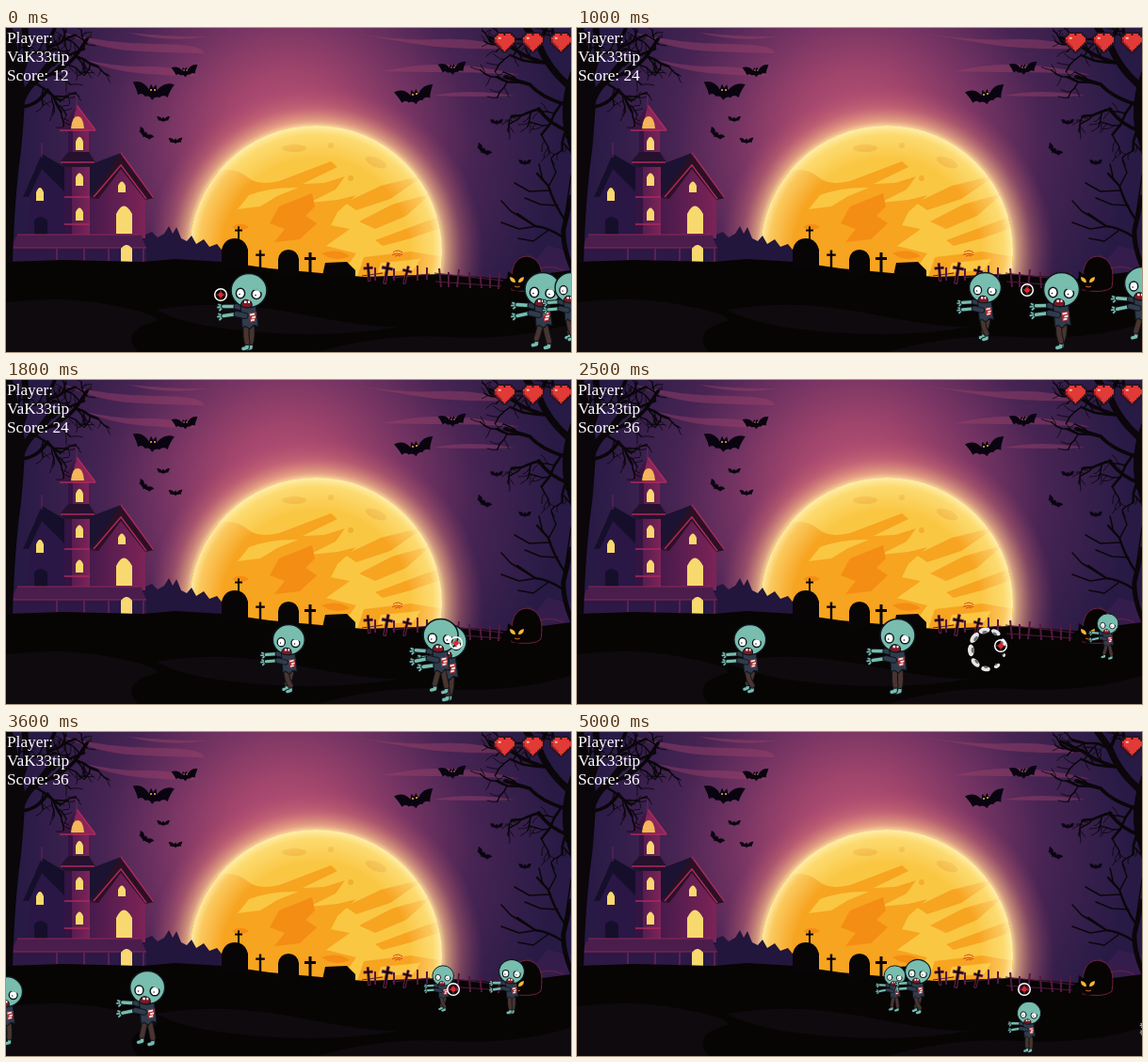
Recreate the animation shown at these times as an HTML page with a canvas. Size 600 px wide and 345 px high, loop 5100 ms.

```html
<!DOCTYPE html>
<html lang="en">
<head>
<meta charset="utf-8">
<title>Graveyard shooter</title>
<style>
  html, body { margin: 0; width: 100%; height: 100%; overflow: hidden; background: #070404; }
  svg, canvas { position: absolute; left: 0; top: 0; width: 600px; height: 345px; }
  #hud { position: absolute; left: 1px; top: .5px; color: #fff; font: 17.3px/20px "Liberation Serif", serif; white-space: pre; }
</style>
</head>
<body>
<svg viewBox="0 0 600 345">
  <defs>
    <radialGradient id="sky" gradientUnits="userSpaceOnUse" cx="300" cy="120" r="290">
      <stop offset="0" stop-color="#c4587a"/><stop offset=".25" stop-color="#a1456c"/>
      <stop offset=".45" stop-color="#763463"/><stop offset=".68" stop-color="#472453"/>
      <stop offset="1" stop-color="#271a45"/>
    </radialGradient>
    <radialGradient id="halo" gradientUnits="userSpaceOnUse" cx="329" cy="238" r="178">
      <stop offset=".74" stop-color="#ffe9a8"/><stop offset=".78" stop-color="#f5bd88" stop-opacity=".75"/>
      <stop offset=".87" stop-color="#d87c76" stop-opacity=".38"/><stop offset="1" stop-color="#b04a70" stop-opacity="0"/>
    </radialGradient>
    <radialGradient id="rim" gradientUnits="userSpaceOnUse" cx="329" cy="238" r="134">
      <stop offset=".74" stop-color="#fff0a8" stop-opacity="0"/><stop offset=".93" stop-color="#ffee9c" stop-opacity=".5"/>
      <stop offset="1" stop-color="#fff3b8" stop-opacity=".9"/>
    </radialGradient>
    <linearGradient id="wall" x2="1">
      <stop offset="0" stop-color="#461a4b"/><stop offset="1" stop-color="#7d2357"/>
    </linearGradient>
    <clipPath id="moon"><circle cx="329" cy="238" r="134"/></clipPath>
    <path id="bat" d="M-1-.35Q-.5-.5-.2-.05L-.12-.32 0-.14 .12-.32 .2-.05Q.5-.5 1-.4Q.78 0 .74.25Q.5.1 .35.3Q.15.2 0 .45Q-.15.2-.35.3Q-.5.1-.7.25Q-.78 0-1-.35Z"/>
    <path id="cross" d="M-1.5-12H1.5V-7H6V-4H1.5V12H-1.5V-4H-6V-7H-1.5Z"/>
  </defs>

  <rect width="600" height="345" fill="url(#sky)"/>
  <g fill="#9d4069" opacity=".45">
    <path d="M60 5Q110 17 160 17T210 27Q160 26 130 24T60 5ZM85 34Q120 42 150 41T205 51Q170 51 140 48T85 34ZM130 5Q180 10 215 9Q170 16 130 5Z"/>
    <path d="M372 6Q420 14 460 12T540 22Q480 23 450 19T372 6ZM400 46Q440 37 475 39T545 50Q500 47 470 47T400 46ZM455 72Q490 64 540 72Q500 74 455 72Z"/>
  </g>

  <circle cx="329" cy="238" r="178" fill="url(#halo)"/>
  <g clip-path="url(#moon)" fill="#f7a420">
    <circle cx="329" cy="238" r="134" fill="#fac743"/>
    <path d="M205 165Q235 140 258 160Q268 168 290 163L345 142 352 148 315 166 338 165 360 158 350 172 322 186 352 183 372 178 352 196 345 210 365 214 340 232 372 240 350 270H190V235Q194 195 205 165Z"/>
    <path d="M360 186L398 168 446 156 408 182 372 194ZM375 206L410 188 452 176 425 200 392 214ZM392 226L462 200 464 212 430 224 400 232ZM380 244L430 238 466 244V268H372Z"/>
    <path fill="#f48d14" d="M290 190L325 176 328 190 318 200 330 208 312 225 285 228 296 214 280 208ZM240 212q9-7 18 0q-9 6-18 0ZM335 240q18-6 30 3q-16 7-30-3Z"/>
    <path fill="#fac743" d="M258 178Q282 169 310 170L288 179 270 190 246 193ZM398 250L440 246 432 258 395 260Z"/>
    <g fill="#f2b033"><ellipse cx="306" cy="128" rx="13" ry="4"/><ellipse cx="393" cy="143" rx="12" ry="5" transform="rotate(22 393 143)"/><circle cx="366" cy="160" r="3"/><circle cx="345" cy="125" r="3"/></g>
    <circle cx="329" cy="238" r="134" fill="url(#rim)"/>
    <path d="M411 239q5-4 10 0M410 241.500q5-3 11 0M413 243q4-2 6 0" stroke="#d8432b" fill="none"/>
  </g>

  <path fill="#22163c" d="M138 252V216l5-6 5 10 7-3 6 6 7-4 5-8 4 8 4-7 5 12 6 3 5-6 5 9 8-5 6 8 8-3 8 10V252Z"/>
  <path fill="#3c2152" opacity=".6" d="M545 252l10-12 8 6 12-14 25 6V270H545Z"/>

  <!-- House -->
  <g>
    <path fill="#2a1745" d="M24 178L39 145 62 172V224H24Z"/>
    <path fill="#150f2b" d="M18 180L38 134 62 148V174L38 150 24 180ZM30 205q6-8 14 0v19H30Z"/>
    <path fill="url(#wall)" d="M88 180L122 142 148 180V224H88Z"/>
    <path fill="#1b1331" d="M88 146L122 133 102 166 88 182Z"/>
    <path fill="#2b1024" d="M122 133L158 181 148 183 122 150 98 182 90 181Z"/>
    <path stroke="#a82a5f" stroke-width="1.500" fill="none" d="M93 180L122 146 149 182M122 133L157 181"/>
    <path fill="url(#wall)" d="M62 142H89V224H62ZM66 106H88V136H66Z"/>
    <path fill="#331443" d="M62 142H70V224H62ZM66 106H71V136H66Z"/>
    <path fill="#8b2458" d="M56 109L75 82 96 109Z"/><path fill="#3c1642" d="M56 109L75 82 69 109Z"/>
    <path fill="#25112e" d="M57 143L66 132H88L95 143 89 148H62Z"/>
    <path stroke="#a82a5f" d="M57 109H95M58 143H94M62 180H89M62 209H89M75 82L95 109" stroke-width="1.500"/>
    <path fill="#2c1946" d="M7 250V234L12 220H143L149 235V250Z"/>
    <path fill="#4a1d4c" d="M5 234L12 220H143L149 234Z"/>
    <path stroke="#8e2659" d="M12 220H143M5 234H149"/>
    <path stroke="#5b2150" stroke-width="2" d="M54 235V250M83 235V250M109 235V250M146 235V250"/>
    <path stroke="#662658" d="M38 122V138M75 72V88M124 121V136"/>
    <path fill="#f4b657" d="M69 107q1-13 7-13t7 13Z"/>
    <path fill="#f8d96f" d="M74 130v-9q4-10 8 0v9ZM74 168v-9q4-9 8 0v9ZM74 205v-9q4-9 8 0v9ZM32 184v-9q4-10 8 0v9ZM119 175v-7q4-9 8 0v7ZM117 219v-21q8-17 17 0v21ZM122 250v-15q6-8 12 0v15Z"/>
  </g>

  <!-- Ground and graves -->
  <path fill="#070404" d="M0 249L60 247 145 249 180 246 230 249 280 256 335 261 380 265 460 262 530 267 600 258V345H0Z"/>
  <path fill="#0e0a0e" d="M0 292Q60 285 112 295T160 312Q120 322 140 345H0ZM160 300Q230 288 310 304T420 318Q350 330 270 324T160 300ZM330 345Q400 325 470 329T600 315V345Z"/>
  <g fill="#080506">
    <path d="M229 256V236Q232 224 243 224T257 236V256ZM289 262V246Q291 236 300 236T311 246V262ZM336 264L339 250 362 249 371 258V267Z"/>
    <use href="#cross" transform="translate(247 219) scale(.65)"/>
    <use href="#cross" transform="translate(270 246) scale(.8)"/>
    <use href="#cross" transform="translate(323 251)"/>
  </g>
  <g stroke="#53193f" fill="none">
    <path d="M378 264L400 261M410 266L450 262M455 261L528 269M456 270L526 275"/>
    <path stroke-width="2" d="M392 255v14M412 256v13M437 253v16M447 255v13M460 256l2 20M470 260v16M481 257l-2 19M492 260l1 17M503 259l2 18M514 262v15M524 260l-1 18"/>
  </g>
  <g fill="#10050d" stroke="#87305a" stroke-width=".8">
    <use href="#cross" transform="translate(385 260) rotate(-5) scale(.8)"/>
    <use href="#cross" transform="translate(404 261) rotate(10) scale(.95)"/>
    <use href="#cross" transform="translate(425 263) rotate(14) scale(.8)"/>
  </g>
  <g fill="#070404" stroke="#74203a">
    <path d="M537 279Q534 244 553 243Q573 246 568 276Q561 283 537 279Z"/>
    <path stroke="none" d="M532 272l1-13 6 4h7l6-4 1 13q-4 8-10 8t-11-8Z"/>
    <path d="M567 256Q580 252 592 258" fill="none"/>
  </g>
  <path fill="#f8b832" d="M535 265q6 1 6 6q-6 0-6-6ZM550 265q-6 1-6 6q6 0 6-6Z"/>
  <path stroke="#c46b25" d="M540 275l3 1 3-1" fill="none"/>

  <!-- Trees -->
  <path fill="#0a0609" d="M0 0H7Q15 30 20 64Q20 90 16 130Q9 180 7 250H0ZM600 45Q588 75 592 105L600 135Z"/>
  <g id="trees" fill="none" stroke="#0a0609" stroke-linecap="round" stroke-linejoin="round">
    <path stroke-width="7" d="M13 90Q18 65 34 54L50 34M12 60L22 28 20 0M598 62Q575 42 566 18L553 0"/>
    <path stroke-width="3.500" d="M34 54Q58 48 74 30L86 12M46 38L44 16 52 0M17 84Q34 82 44 66M10 30L4 0M596 82Q570 75 556 60L530 52M578 38Q555 34 536 20L514 10M566 18L574 0M598 110Q576 102 566 86"/>
    <path stroke-width="5" d="M603 260Q591 235 592 215L600 180"/>
    <path stroke-width="2.500" d="M592 223Q575 212 562 211L543 198M594 205Q582 188 576 168L564 155"/>
    <path stroke-width="1.500" d="M564 211L545 214 526 207M554 206L536 195 526 184M577 173L556 174 540 165M570 162L566 145M576 169L584 154 579 140M594 199L600 157M586 189L568 188 551 181M575 216L560 227 544 224"/>
  </g>

  <g fill="#090410">
    <use href="#bat" transform="translate(156 67) rotate(5) scale(22)"/>
    <use href="#bat" transform="translate(190 46) rotate(-5) scale(14)"/>
    <use href="#bat" transform="translate(148 113) rotate(38) scale(9)"/>
    <use href="#bat" transform="translate(167 97) scale(7)"/>
    <use href="#bat" transform="translate(180 120) scale(7.500)"/>
    <use href="#bat" transform="translate(434 72) rotate(-10) scale(21)"/>
    <use href="#bat" transform="translate(474 43) rotate(-4) scale(15)"/>
    <use href="#bat" transform="translate(507 130) rotate(38) scale(9)"/>
    <use href="#bat" transform="translate(521 100) scale(7)"/>
    <use href="#bat" transform="translate(551 143) scale(7)"/>
  </g>
  <g fill="#f3b73d">
    <circle cx="154" cy="66" r="1"/><circle cx="158" cy="66" r="1"/><circle cx="432" cy="71" r="1"/><circle cx="436" cy="70" r="1"/>
    <circle cx="189" cy="45" r=".7"/><circle cx="192" cy="45" r=".7"/><circle cx="473" cy="42" r=".7"/><circle cx="476" cy="42" r=".7"/>
  </g>
</svg>
<canvas id="game" width="600" height="345"></canvas>
<div id="hud"></div>

<script>
const LOOP = 5100, STEP = 100;
const g = document.getElementById('game').getContext('2d');
const hud = document.getElementById('hud');
const INK = '#0f171d', SKIN = '#78bdae', CLOTH = '#303b4c', TROUSERS = '#4a342f';

// x at time zero, speed in px/s, top, height, time of death
const zombies = [
  { x: 258, v: 60, top: 261, h: 82, dies: 200 },
  { x: 570, v: 55.5, top: 260, h: 82, dies: 2300 },
  { x: 600, v: 166.5, top: 260, h: 73 },
  { x: 773, v: 173, top: 254, h: 80 },
  { x: 790, v: 90.5, top: 248.5, h: 49 },
  { x: 987, v: 125, top: 242, h: 58 },
  { x: 1130, v: 130, top: 287, h: 54 },
  { x: 1270, v: 130, top: 289, h: 54 }
];
// time, x, y
const aim = [[0, 228, 284], [200, 228, 284], [700, 470, 281], [1000, 478, 279], [1800, 478, 280],
  [2200, 450, 283], [2500, 450, 283], [3000, 477, 271], [3500, 475, 274], [LOOP, 475, 274]];
const heart = new Path2D('M2 0h3v1h1v-1h3v1h1v1h1v3h-1v1h-1v1h-1v1h-1v1h-1v1h-1v-1h-1v-1h-1v-1h-1v-1h-1v-1h-1v-3h1v-1h1z');

// Forking twigs, grown once into the tree group
let seed = 7;
const random = () => (seed = seed * 16807 % 2147483647) / 2147483647;
const twigs = ['', '', ''];
function grow(x, y, angle, length, level) {
  twigs[level] += `M${x} ${y}`;
  for (let i = 0; i < 3; i++) {
    angle += (random() - .5) * .9;
    x += Math.cos(angle) * length / 3;
    y += Math.sin(angle) * length / 3;
    twigs[level] += `L${x.toFixed(1)} ${y.toFixed(1)}`;
    if (level < 2) grow(x, y, angle + (random() < .5 ? -.8 : .8), length * .55, level + 1);
  }
}
for (const [x, y, angle, length] of [
  [34, 54, .1, 44], [30, 58, .7, 34], [50, 40, -.3, 38], [44, 66, .9, 28], [22, 28, -.6, 30],
  [74, 30, 0, 26], [46, 20, -.4, 30], [12, 30, -1.2, 26],
  [566, 18, 3.3, 42], [578, 38, 2.8, 44], [556, 60, 3, 36], [566, 86, 2.4, 30],
  [590, 80, 2.2, 40], [585, 20, -2, 24], [536, 20, 2.9, 24], [596, 105, 2, 26]
]) grow(x, y, angle, length, 0);
document.getElementById('trees').innerHTML +=
  twigs.map((d, i) => `<path stroke-width="${[2.6, 1.5, .8][i]}" d="${d}"/>`).join('');

function shape(color, d, line = 1.2) {
  const path = new Path2D(d);
  g.fillStyle = color;
  g.fill(path);
  if (line) { g.lineWidth = line; g.strokeStyle = INK; g.stroke(path); }
}

function limb(color, width, d) {
  const path = new Path2D(d);
  for (const [c, w] of [[INK, width + 2], [color, width]]) {
    g.strokeStyle = c; g.lineWidth = w; g.stroke(path);
  }
}

function oval(x, y, rx, ry, color, line = 0) {
  g.beginPath();
  g.ellipse(x, y, rx, ry, 0, 0, 7);
  g.fillStyle = color;
  g.fill();
  if (line) { g.lineWidth = line; g.strokeStyle = INK; g.stroke(); }
}

function at(x, y, scale, draw) {
  g.save();
  g.translate(x, y);
  g.scale(scale, scale);
  draw();
  g.restore();
}

function arm(y, drop) {
  limb(SKIN, 1.8, `M-27 ${y + drop}l-5-2M-27 ${y + drop}l-6 1M-27 ${y + drop}l-4 4`);
  limb(SKIN, 3.6, `M-13 ${y}L-27 ${y + drop}`);
  limb(CLOTH, 5, `M-4 ${y + 2}L-13 ${y}`);
}

function zombie(swing) {
  for (const side of [1, -1]) {
    const foot = -1 + side * (2 + 5 * swing), up = Math.max(0, -side * swing) * 3;
    limb(SKIN, 3.5, `M${foot + 1} ${57 - up}v4l-4 1`);
    limb(TROUSERS, 5, `M${side * 3} 40L${side * 3 + swing * side * 2} ${48 - up / 2}L${foot + 1} ${55 - up}`);
  }
  arm(17, 0 - swing);
  shape(CLOTH, 'M-9 14H7L10 38 5 37 1 41-4 38-7 40Z');
  shape('#a72c35', 'M0 24L8 23 7 33 1 34Z', 0);
  shape('#f0e8df', 'M1 25l5-1v2l-5 1zM3 28l4-1v2l-4 1zM2 31l4-1v2l-4 1z', 0);
  arm(25, 2 + swing);
  oval(0, 0, 19, 18, SKIN, 1.6);
  oval(-9, 3, 4.6, 5.2, '#fff', 1.5);
  oval(8, 4, 5, 5, '#fff', 1.5);
  oval(-10, 4, .8, .8, INK);
  oval(7, 5, .8, .8, INK);
  shape(SKIN, 'M2-2L14-2 14 2Z', 0);
  shape('#7d1824', 'M-9 16Q-7 9-2 10Q4 11 3 17Q-3 20-9 16Z');
  shape('#fff', 'M-5 11h2.500v2.500h-2.500zM-1 11h2v2.500h-2z', 0);
}

function burst(x, y, age) {
  const r = 13 + age / 40, size = 1 - Math.max(0, age - 250) / 300;
  for (let i = 0; i < 9; i++) {
    const a = i * 0.7 + 0.3, n = Math.abs(Math.sin(i * 12.9));
    g.save();
    g.translate(x + Math.cos(a) * r, y + Math.sin(a) * r * 1.15);
    g.rotate(a);
    oval(0, 0, (1.4 + 2 * n) * size, (2 + 4.5 * n) * size, '#e6e6e6');
    oval(-1.8, 0, (.6 + n) * size, (1 + 2 * n) * size, '#6d6d70');
    g.restore();
  }
}

function crosshair(t) {
  const i = aim.findIndex(k => k[0] > t);
  const [t0, x0, y0] = aim[i - 1], [t1, x1, y1] = aim[i];
  const p = (t - t0) / (t1 - t0), e = p * p * (3 - 2 * p);
  const x = x0 + (x1 - x0) * e, y = y0 + (y1 - y0) * e;
  g.beginPath();
  g.arc(x, y, 6.3, 0, 7);
  g.strokeStyle = '#fff';
  g.lineWidth = 1.5;
  g.stroke();
  oval(x, y, 2.6, 2.6, '#d92a30');
  g.strokeStyle = '#d92a30';
  g.lineWidth = 1;
  g.stroke(new Path2D(`M${x - 4} ${y}h8M${x} ${y - 4}v8`));
}

function render(t) {
  g.clearRect(0, 0, 600, 345);
  g.lineCap = g.lineJoin = 'round';
  let score = 12, lost = 0;
  zombies.forEach((z, i) => {
    const scale = z.h / 82, age = t - z.dies;
    const x = z.x - z.v * (age > 0 ? z.dies : t) / 1000;
    if (age >= 0) {
      score += 12;
      if (age < 450) burst(x - 6, z.top + 27, age);
    } else if (x < -20) lost++;
    else at(x, z.top + 18.5 * scale, scale, () => zombie(Math.sin(t / 130 + i * 2)));
  });
  for (let i = lost; i < 3; i++) {
    at(519 + 30 * i, 6, 1.9, () => {
      g.strokeStyle = '#2a121c'; g.lineWidth = 1.6; g.lineJoin = 'miter'; g.stroke(heart);
      g.fillStyle = '#e23a36'; g.fill(heart);
      g.fillStyle = '#a92029'; g.fillRect(0, 3, 1, 2); g.fillRect(1, 5, 1, 1); g.fillRect(2, 6, 1, 1); g.fillRect(3, 7, 1, 1);
      g.fillStyle = '#ffc6bd'; g.fillRect(2, 2, 1.5, 1);
    });
  }
  crosshair(t);
  hud.textContent = `Player:\nVaK33tip\nScore: ${score}`;
}

function tick() {
  render(Math.floor(performance.now() % LOOP / STEP) * STEP);
  requestAnimationFrame(tick);
}
tick();
</script>
</body>
</html>
```
